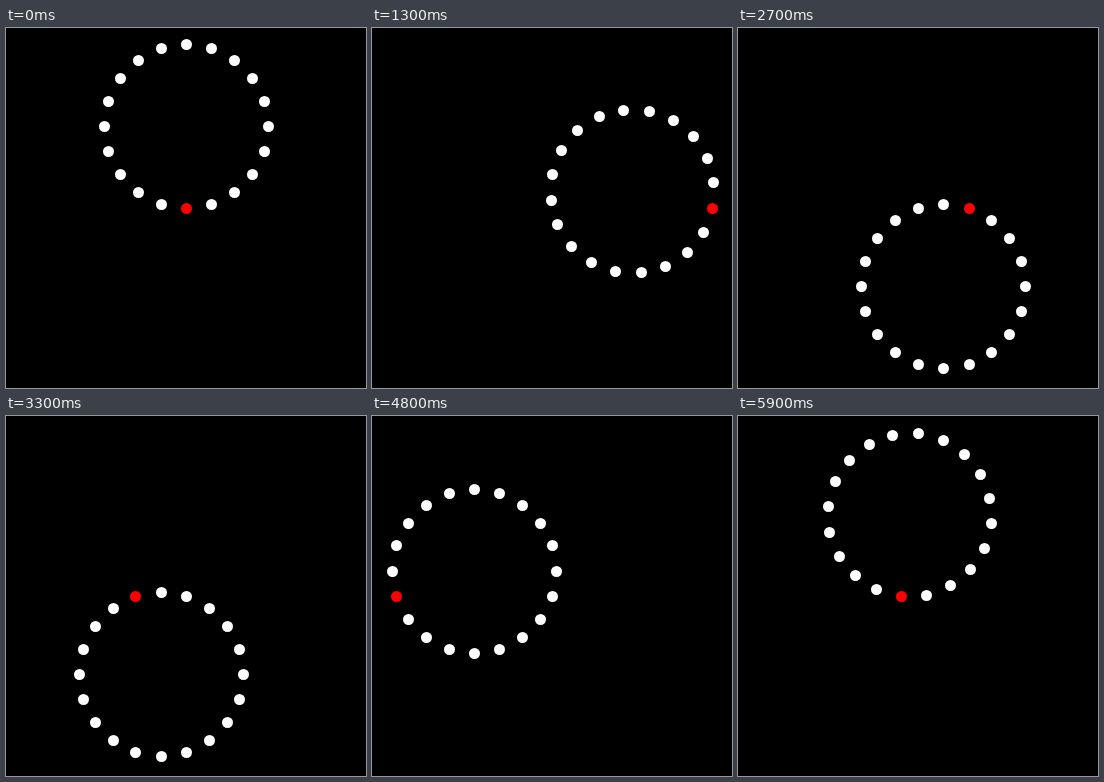
An HTML page that plays this animation: 360 by 360 pixels, repeating every 6000 ms.

```html
<!DOCTYPE html>
<html lang="en">
<head>
<meta charset="utf-8">
<title>Rolling ring</title>
<style>
  html, body { margin: 0; width: 100%; height: 100%; overflow: hidden; background: #000; }
  svg { display: block; width: 100vw; height: 100vh; }
</style>
</head>
<body>
<svg id="stage" viewBox="0 0 360 360"></svg>
<script>
const LOOP = 6000, STEP = 100;
const MID = 180, R = 360 / 4.4, COUNT = 20;
const TAU = Math.PI * 2;
const stage = document.getElementById('stage');

const dots = Array.from({ length: COUNT }, (_, i) => {
  const dot = document.createElementNS('http://www.w3.org/2000/svg', 'circle');
  dot.setAttribute('r', 5.5);
  dot.setAttribute('fill', i ? '#fff' : '#f00');
  return stage.appendChild(dot);
});

// Dots sit on whole pixels.
const snap = v => Math.round(v) + 0.5;

// The ring's centre circles the stage clockwise while the ring spins
// the other way, so the red dot slides along a straight line.
function draw(time) {
  const tick = Math.floor((time % LOOP) / STEP + 1e-6);
  const turn = tick * STEP / LOOP * TAU;
  const cx = MID + R * Math.sin(turn);
  const cy = MID - R * Math.cos(turn);
  dots.forEach((dot, i) => {
    const a = turn + i / COUNT * TAU;
    dot.setAttribute('cx', snap(cx + R * Math.sin(a)));
    dot.setAttribute('cy', snap(cy + R * Math.cos(a)));
  });
}

function loop() {
  draw(performance.now());
  requestAnimationFrame(loop);
}
loop();
</script>
</body>
</html>
```
